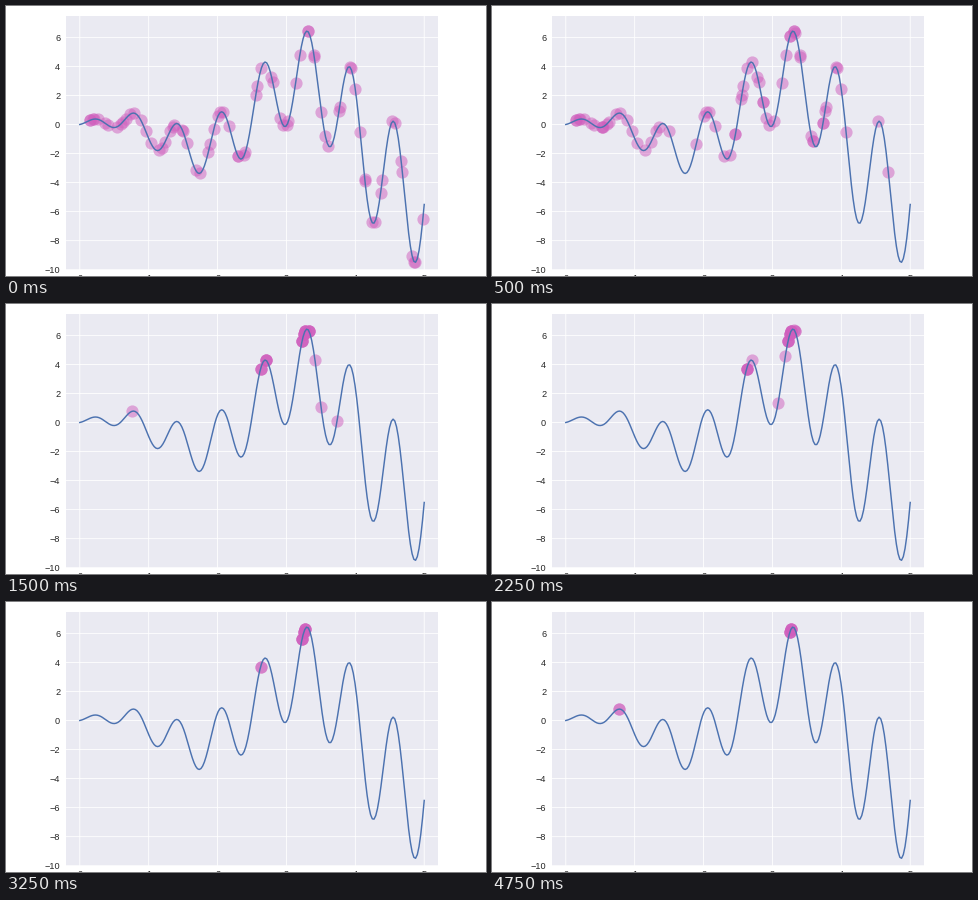
Animation of 480x270 px, one loop 5 s. Source, as a matplotlib script:

```python
import matplotlib.pyplot as plt
import numpy as np
from matplotlib.animation import FuncAnimation

plt.rcParams["font.family"] = "Liberation Sans"

FRAMES, INTERVAL = 20, 250
X_MAX, GENES, POP = 5, 1024, 76
MAX_COPIES = 4
PEAK = 672  # gene of the highest point

# winning genes: (generation before the first copy, generation of extinction)
LINES = {
    109: (0, 6), 154: (2, 7), 504: (0, 6), 521: (1, 6), 537: (3, 15),
    553: (1, 10), 585: (0, 6), 660: (2, 17), 666: (0, 25), 669: (2, 25),
    681: (1, 11), 733: (0, 6), 764: (0, 7), 158: (17, 21),
}


def fitness(x):
    return x * (np.sin(10 * x) + np.cos(2 * x))


def decode(genes):
    return np.asarray(genes) * X_MAX / (GENES - 1)


# The first population covers the range; fitter members live longer.
rng = np.random.default_rng(7)
first = (np.arange(POP) + rng.uniform(-0.5, 1.5, POP)) * GENES / POP
first = np.clip(first, 30, GENES - 5)
life = 2.6 + 0.45 * fitness(decode(first)) + rng.normal(0, 1, POP)


def winners(gen):
    genes = []
    for gene, (born, gone) in LINES.items():
        genes += [gene] * min(gen - born, gone - gen, MAX_COPIES)
    return genes


def mutants(gen):
    """A few strays around the peak while the population still converges."""
    count = min(gen - 4, 12 - gen, 4)
    if count <= 0:
        return []
    return list(np.random.default_rng(gen).normal(PEAK, 25, count))


def points(gen):
    alive = first[np.maximum(life, 0) >= gen]
    x = decode(list(alive) + mutants(gen) + winners(gen))
    return np.column_stack([x, fitness(x)])


fig = plt.figure(figsize=(8, 4.5), dpi=60, facecolor="white")
ax = fig.add_axes([0.125, 6.3 / 270, 0.775, 254.1 / 270], facecolor="#EAEAF2")
ax.set(xlim=(-0.2, 5.2), ylim=(-10, 7.5),
       xticks=range(6), yticks=range(-10, 7, 2))
ax.set_axisbelow(True)
ax.grid(color="white", lw=1, snap=False)
ax.tick_params(length=0, pad=7, labelsize=11, labelcolor="0.15")
ax.tick_params(axis="x", pad=5.5)
for spine in ax.spines.values():
    spine.set_visible(False)

xs = np.linspace(0, X_MAX, 200)
ax.plot(xs, fitness(xs), color="#4C72B0", lw=1.75)
dots = ax.scatter([], [], s=215, lw=0, color="#D05EBD", alpha=0.5, zorder=1)


def update(gen):
    dots.set_offsets(points(gen))
    return dots,


anim = FuncAnimation(fig, update, frames=FRAMES, interval=INTERVAL,
                     init_func=lambda: update(0), repeat=True, repeat_delay=0)
plt.show()
```
